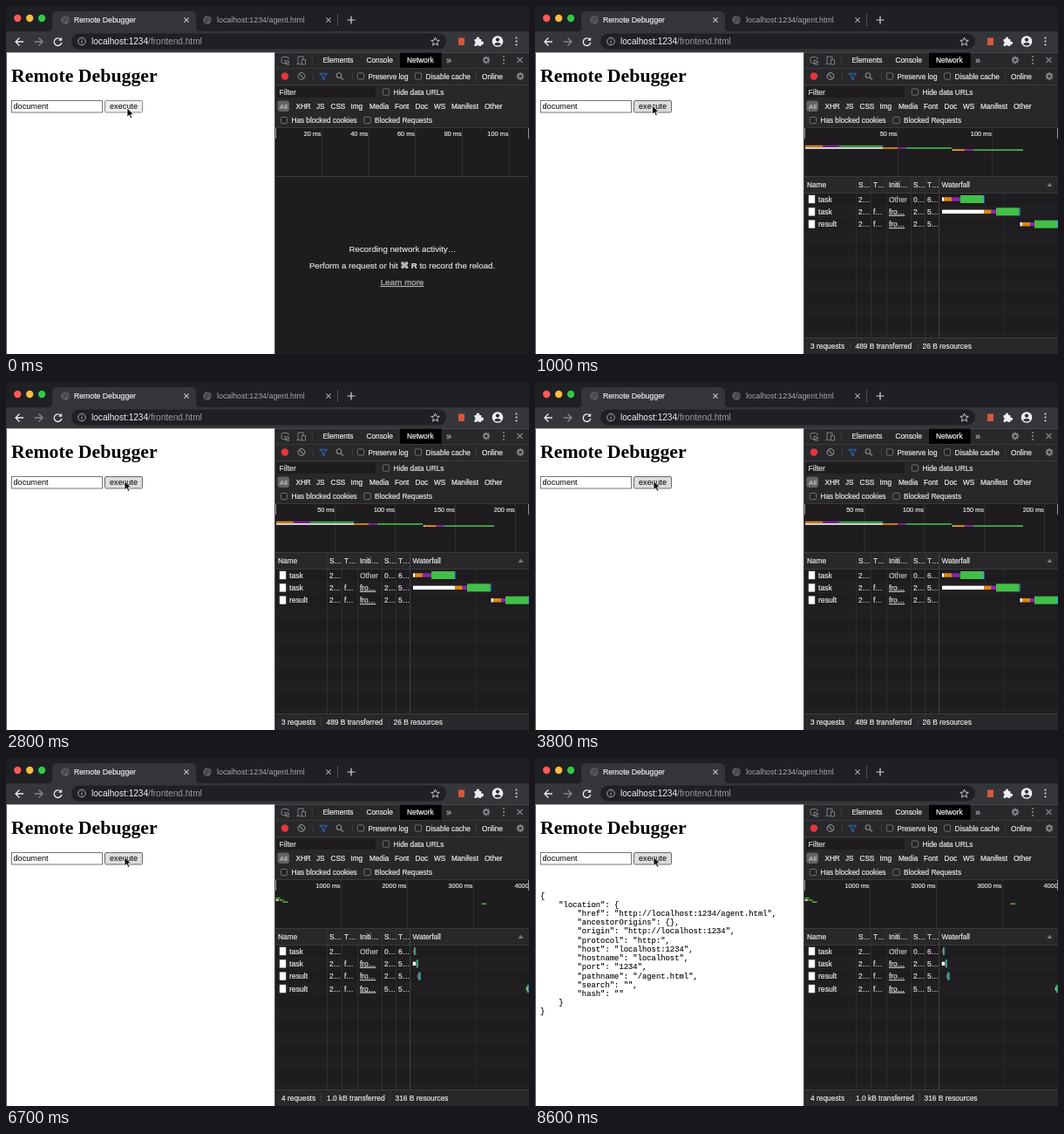
Recreate the animation shown at these times as an HTML page. Size 600 px wide and 399 px high, loop 8800 ms.

```html
<!DOCTYPE html>
<html lang="en">
<head>
<meta charset="utf-8">
<title>Remote Debugger</title>
<style>
  html, body { margin: 0; width: 100%; height: 100%; overflow: hidden; background: #fff; }
  svg { display: block; width: 100vw; height: 100vh; }
  text { font-family: "Liberation Sans", Arial, sans-serif; white-space: pre; }
  .dev text { stroke: currentColor; stroke-width: .22px; }
  .serif { font-family: "Liberation Serif", "Times New Roman", serif; font-weight: bold; }
  .mono { font-family: "Liberation Mono", Courier, monospace; }
</style>
</head>
<body>
<svg id="stage" viewBox="0 0 600 399" preserveAspectRatio="none"></svg>
<script>
const LOOP = 8800;
const PANEL = '#1e1c1f', BAR = '#28282b', ICON = '#85878b';
const esc = s => s.replace(/&/g, '&amp;').replace(/</g, '&lt;');
const rect = (x, y, w, h, fill, more = '') =>
  `<rect x="${x}" y="${y}" width="${w}" height="${h}" fill="${fill}" ${more}/>`;
const text = (x, y, s, size = 8.34, fill = '#ececec', more = '') =>
  `<text x="${x}" y="${y}" font-size="${size}" fill="${fill}" ${more}>${esc(s)}</text>`;
const path = (d, stroke, width = 1, fill = 'none', more = '') =>
  `<path d="${d}" stroke="${stroke}" stroke-width="${width}" fill="${fill}" ${more}/>`;
const disc = (x, y, r, fill, more = '') =>
  `<circle cx="${x}" cy="${y}" r="${r}" fill="${fill}" ${more}/>`;
const ring = (x, y, r, stroke, width = 1) => disc(x, y, r, 'none', `stroke="${stroke}" stroke-width="${width}"`);
const group = (id, body, more = '') => `<g id="${id}" ${more}>${body}</g>`;
const cross = (x, y, r, c) => path(`M${x - r} ${y - r}l${2 * r} ${2 * r}m0 ${-2 * r}l${-2 * r} ${2 * r}`, c, 1.1);
const hline = (y, c = '#3a3a3d') => rect(309, y, 291, 1, c);
const vline = (x, y, h, c = '#3e3e41') => rect(x, y, .8, h, c);
const dots = (x, y, c) => [-4, 0, 4].map(d => disc(x, y + d, 1.1, c)).join('');

function gear(x, y) {
  const teeth = [0, 45, 90, 135].map(a =>
    `<path d="M0 -4.4V4.4" stroke="${ICON}" stroke-width="1.6" transform="translate(${x} ${y}) rotate(${a})"/>`);
  return teeth.join('') + disc(x, y, 3.2, ICON) + disc(x, y, 1.6, BAR);
}

function globe(x, y) {
  return disc(x, y, 4.8, '#5c5e62') +
    path(`M${x - 3.5} ${y - 2}l3 1 .5 2-2 1 .5 2M${x + 1} ${y - 4}l-.5 2 3 1.5-1 2.5`, '#3d3f43', 1.4);
}

function star(x, y, r) {
  let d = '';
  for (let i = 0; i < 10; i++) {
    const a = -Math.PI / 2 + i * Math.PI / 5, q = i % 2 ? r * .45 : r;
    d += `${i ? 'L' : 'M'}${(x + q * Math.cos(a)).toFixed(2)} ${(y + q * Math.sin(a)).toFixed(2)}`;
  }
  return path(d + 'Z', '#c4c7ca', 1);
}

function browser() {
  const tab = 'M47 30Q53 30 53 24V12Q53 6 59 6H212Q218 6 218 12V24Q218 30 224 30Z';
  return rect(0, 0, 600, 53, '#1f2024') +
    ['#fc5b57', '#fdbc40', '#34c84a'].map((c, i) => disc(13.3 + i * 13.9, 14, 4.15, c)).join('') +
    path(tab, 'none', 0, '#35363a') + rect(0, 29, 600, 24.6, '#35363a') +
    globe(68, 16) + text(78, 19.3, 'Remote Debugger', 8.7, '#f0f1f2', 'stroke="#f0f1f2" stroke-width=".15"') +
    cross(207, 16, 2.6, '#c8cacd') +
    globe(231, 16) + text(242, 19.3, 'localhost:1234/agent.html', 8.85, '#a4a7ab') + cross(370, 16, 2.6, '#a4a7ab') +
    rect(380, 9, 1, 14, '#4d4f53') + path('M391.5 16h9M396 11.5v9', '#d4d6d8', 1.2) +
    path('M20 41H11.5M15.5 36.5L11 41l4.5 4.5', '#e8eaed', 1.3) +
    path('M33 41h8.5M37.5 36.5L42 41l-4.5 4.5', '#85888c', 1.3) +
    path('M62.8 38.3A4.3 4.3 0 1 0 63.8 42', '#e8eaed', 1.4) + path('M64.2 35.8v4h-4z', 'none', 0, '#e8eaed') +
    rect(75, 31.5, 430, 18, '#1f2024', 'rx="9"') +
    ring(87, 40.5, 4.3, '#aeb1b5') + rect(86.5, 39.8, 1.1, 3, '#aeb1b5') + rect(86.5, 37.9, 1.1, 1.1, '#aeb1b5') +
    `<text x="98" y="44" font-size="10.1" fill="#f0f1f2">localhost:1234<tspan fill="#9a9da2">/frontend.html</tspan></text>` +
    star(492.5, 41, 5) + rect(519, 36.5, 7, 8.5, '#d9573b') +
    path('M537.5 38h2.2a1.8 1.8 0 1 1 3.4 0h2.2v2.8a1.8 1.8 0 1 1 0 3.2v2h-2.6a1.6 1.6 0 0 0-3 0h-2.2v-2.6a1.6 1.6 0 0 0 0-3z', 'none', 0, '#eceef0') +
    disc(564, 40.5, 6.3, '#f0f1f2') + disc(564, 38.6, 2.2, '#35363a') +
    path('M559.8 43.8Q564 39.7 568.2 43.8Q564 47 559.8 43.8Z', 'none', 0, '#35363a') +
    dots(585.5, 40.5, '#d8dadd');
}

const json = [
  '{', '    "location": {',
  '        "href": "http://localhost:1234/agent.html",',
  '        "ancestorOrigins": {},',
  '        "origin": "http://localhost:1234",',
  '        "protocol": "http:",',
  '        "host": "localhost:1234",',
  '        "hostname": "localhost",',
  '        "port": "1234",',
  '        "pathname": "/agent.html",',
  '        "search": "",',
  '        "hash": ""', '    }', '}'
];

function page() {
  return rect(0, 53.6, 309, 346, '#fff') + rect(0, 53.6, 1, 346, '#55565a') +
    text(6, 87.4, 'Remote Debugger', 21.8, '#000', 'class="serif"') +
    rect(6.5, 108.5, 104, 13.5, '#fff', 'stroke="#767676"') + text(8.5, 118.3, 'document', 9.15, '#000') +
    rect(113.5, 108.5, 43, 13.5, '#efefef', 'id="button" stroke="#767676" rx="1.5"') +
    text(119, 118.3, 'execute', 9.15, '#000') +
    group('json', json.map((s, i) => text(6, 160.6 + i * 10.22, s, 8.87, '#000', 'class="mono" stroke="#000" stroke-width=".1"')).join(''));
}

const check = (x, y, label) =>
  rect(x - 3.6, y - 3.6, 7.2, 7.2, '#242427', 'stroke="#77797c" stroke-width=".9" rx="1.2"') + text(x + 8.5, y + 3, label, 8.2);

function toolbar() {
  const kinds = [['XHR', 332.5], ['JS', 356], ['CSS', 372.5], ['Img', 395.5], ['Media', 417],
    ['Font', 446], ['Doc', 469.5], ['WS', 491], ['Manifest', 511], ['Other', 549]];
  return rect(309, 53.6, 291, 85.4, BAR) + rect(452, 53.6, 47.5, 17.4, '#000') +
    path('M322 65.5h-4.5q-1.5 0-1.5-1.5v-4q0-1.5 1.5-1.5h5q1.5 0 1.5 1.5v1.5M320 62l5 2-2 .8 1.8 2-1 .9-1.8-2-.8 1.8z', ICON, .9) +
    path('M335 66.5V58h6v3M333.5 66.5h5M339.5 61.5h4v5.5h-4z', ICON, .9) + vline(351, 56, 12) +
    text(363.5, 65.3, 'Elements', 8.4) + text(413.5, 65.3, 'Console', 8.3) +
    text(460, 65.3, 'Network', 8.4, '#fff') + text(505, 65.6, '»', 11, '#9aa0a6', 'stroke="none"') +
    gear(551, 62) + dots(571, 62, ICON) + cross(589.5, 62, 3, ICON) + hline(71) +
    disc(320, 80.5, 4.2, '#e8353b') +
    group('clear', ring(339, 80.5, 3.8, ICON, 1.2) + path('M336.4 77.9l5.2 5.2', ICON, 1.2)) +
    vline(352, 74, 13) + path('M360 77.3h8.5l-3.2 3.8v3.5l-2-1v-2.5z', '#2f609a', 1.1, '#23364f') +
    ring(382, 79.6, 2.8, ICON, 1.1) + path('M384 81.8l3 3', ICON, 1.3) + vline(397, 74, 13) +
    check(407, 80.5, 'Preserve log') + check(473, 80.5, 'Disable cache') + vline(539, 74, 13) +
    text(546, 83.5, 'Online', 8.3) + gear(590, 80.5) + hline(90) +
    rect(311, 92, 113, 13, PANEL) + text(313.5, 101.7, 'Filter', 8.7, '#d0d0d0') +
    check(436, 98.5, 'Hide data URLs') +
    rect(311.5, 108.5, 13.5, 12.5, '#636366', 'rx="3"') + text(314, 117.5, 'All', 8.1, '#b0b0b0', 'stroke="none"') +
    kinds.map(([s, x]) => text(x, 117.5, s, 8.2, '#f4f4f4')).join('') +
    check(319, 131, 'Has blocked cookies') + check(414.5, 131, 'Blocked Requests');
}

// Time axis: first grid line, spacing and milliseconds per division
function ruler(id, x, gap, step) {
  let out = '';
  for (let i = 1; x < 625; i++, x += gap)
    out += vline(x, 140, 55, '#363538') + text(x - .5, 149, `${i * step} ms`, 7.3, '#e0e0e0', 'text-anchor="end"');
  return group(id, out);
}

const C = { w: '#fff', o: '#f0960f', p: '#8e24aa', g: '#41c047', b: '#2e9bd6' };

// A bar is a start followed by colour/end pairs
function bar(y, x, parts, thick, thin) {
  return parts.map(([c, end]) => {
    const h = c === 'g' || c === 'b' ? thick : thin;
    const out = rect(x, y - h / 2, end - x, h, C[c]) +
      (c === 'o' && thin > 2 ? path(`M${x} ${y}H${end}`, '#a8680c', thin, 'none', 'stroke-dasharray=".6 1.4"') : '');
    x = end;
    return out;
  }).join('');
}

const rowY = i => 221.5 + i * 14.35;

function row(i, name, cells) {
  const y = rowY(i) + 3, xs = [371, 388, 406, 434, 450];
  return rect(314, y - 7.5, 7, 9, '#fff', 'stroke="#c8c8c8" stroke-width=".5"') + text(325, y, name, 8.6) +
    cells.map((s, k) => text(xs[k], y, s, 8.4, s === 'Other' ? '#a8a8a8' : '#e0e0e0',
      s === 'fro…' ? 'text-decoration="underline"' : s === 'Other' ? 'stroke="none"' : '')).join('');
}

function table() {
  const heads = [['Name', 312], ['S…', 371], ['T…', 388], ['Initi…', 406], ['S…', 434], ['T…', 450], ['Waterfall', 466.5]];
  let stripes = '';
  for (let i = 1; i < 12; i += 2) stripes += rect(309, rowY(i) - 7.2, 291, Math.min(14.35, 387 - rowY(i)), '#211f22');
  return rect(309, 196, 291, 184, PANEL) + stripes + rect(309, 196, 291, 18, BAR) + hline(214) +
    [368, 385, 403, 431, 447].map(x => vline(x, 196, 184, '#333235')).join('') +
    vline(463.3, 196, 184, '#4c4b4e') + vline(538.5, 214, 166, '#2b2a2d') +
    heads.map(([s, x]) => text(x, 208, s, 8.3)).join('') +
    path('M587.5 207l3-4.5 3 4.5z', 'none', 0, '#77797c') +
    row(0, 'task', ['2…', '', 'Other', '0…', '6…']) + row(1, 'task', ['2…', 'f…', 'fro…', '2…', '5…']) +
    row(2, 'result', ['2…', 'f…', 'fro…', '2…', '5…']) +
    rect(309, 380, 291, 19, BAR) + hline(380);
}

function footer(count, sent, size, x2, x3) {
  return text(316, 393, count + ' requests', 8.4) + vline(361, 385, 10) + text(x2, 393, sent + ' transferred', 8.4) +
    vline(x3 - 6, 385, 10) + text(x3, 393, size + ' resources', 8.4);
}

function early() {
  return bar(160.7, 310, [['o', 330], ['p', 349], ['g', 399]], 1.6, 1.8) +
    bar(162.9, 310, [['w', 399], ['o', 416], ['p', 426], ['g', 478]], 1.6, 1.6) +
    bar(165.1, 479, [['w', 480], ['o', 493], ['p', 503], ['g', 560]], 1.6, 1.8) +
    bar(rowY(0), 467, [['w', 469], ['o', 478], ['p', 488], ['g', 514], ['b', 515.5]], 9, 4.4) +
    bar(rowY(1), 467, [['w', 515], ['o', 523.5], ['p', 529], ['g', 555.5], ['b', 556.5]], 9, 4.4) +
    bar(rowY(2), 556.5, [['w', 559], ['o', 568], ['p', 573], ['g', 599], ['b', 600]], 9, 4.4) +
    footer(3, '489 B', '26 B', 367.5, 444.5);
}

function late() {
  return [[160.7, 309.5, 314.5], [163, 314, 318.5], [165.2, 318, 323.5], [167.2, 545.5, 551]]
      .map(([y, a, b]) => bar(y, a, [['o', a + 1], ['g', b]], 1.5, 1.5)).join('') +
    bar(163, 309.5, [['w', 313]], 1.5, 1.5) +
    bar(rowY(0), 466.7, [['p', 468], ['g', 469.6], ['b', 470.2]], 9, 4) +
    bar(rowY(1), 466.7, [['w', 470], ['p', 470.8], ['g', 472.2], ['b', 473]], 9, 4.4) +
    bar(rowY(2), 471.5, [['p', 473], ['g', 474.6], ['b', 475.8]], 9, 4) +
    bar(rowY(3), 596.8, [['w', 597.8], ['g', 599.3], ['b', 600]], 9, 4) +
    row(3, 'result', ['2…', 'f…', 'fro…', '5…', '5…']) +
    footer(4, '1.0 kB', '316 B', 368, 446.5);
}

const mid = 'text-anchor="middle" stroke="none"';
const empty = text(455, 282, 'Recording network activity…', 9.7, '#d6d6d6', mid) +
  `<text x="454.5" y="301" font-size="9.7" fill="#d6d6d6" ${mid}>Perform a request or hit <tspan font-weight="bold">⌘ R</tspan> to record the reload.</text>` +
  text(454.5, 320, 'Learn more', 9.7, '#a0a0a0', mid + ' text-decoration="underline"');

const devtools = rect(308, 53.6, 292, 346, PANEL) + toolbar() + hline(139) +
  ruler('axis20', 362, 53.7, 20) + ruler('axis50a', 416, 108.3, 50) +
  ruler('axis50b', 377.5, 68.9, 50) + ruler('axis1000', 384, 76, 1000) +
  rect(309, 140, 1, 12, '#9a9b9e') + rect(599, 140, 1, 12, '#9a9b9e') + hline(195) +
  group('empty', empty) + group('table', table()) + group('early', early()) + group('late', late()) +
  rect(308, 53.6, 1, 346, '#48494c');

const cursor = path('M0 0V10.2L2.4 8L4.1 11.8L5.8 11L4.2 7.3H7.4Z', '#fff', .8, '#000', 'id="cursor"');

document.getElementById('stage').innerHTML =
  browser() + page() + group('dev', devtools, 'class="dev" color="#d8d8d8"') + cursor;

const $ = id => document.getElementById(id);

// [element, shown from, hidden from]
const spans = [
  ['empty', 0, 800], ['axis20', 0, 800],
  ['table', 800, LOOP], ['axis50a', 800, 1100], ['axis50b', 1100, 3900], ['early', 800, 3900],
  ['axis1000', 3900, LOOP], ['late', 3900, LOOP], ['json', 6800, LOOP]
];
const moves = [[0, 139, 117], [200, 136.5, 115.5], [300, 134.5, 114], [1100, 136, 113.5]];
const fills = [[0, '#efefef', '#8a8a8a'], [300, '#f3f3f3', '#8a8a8a'], [600, '#dcdcdc', '#6a6a6a']];
const at = (steps, t) => steps.filter(s => s[0] <= t).pop();

function draw(t) {
  for (const [id, from, to] of spans) $(id).style.display = t >= from && t < to ? '' : 'none';
  const [, x, y] = at(moves, t), [, fill, edge] = at(fills, t);
  $('cursor').setAttribute('transform', `translate(${x} ${y})`);
  $('button').setAttribute('fill', fill);
  $('button').setAttribute('stroke', edge);
  $('clear').setAttribute('opacity', t < 600 ? .85 : 1);
}

const start = performance.now();
function tick() {
  draw((performance.now() - start) % LOOP);
  requestAnimationFrame(tick);
}
draw(0);
requestAnimationFrame(tick);
</script>
</body>
</html>
```
